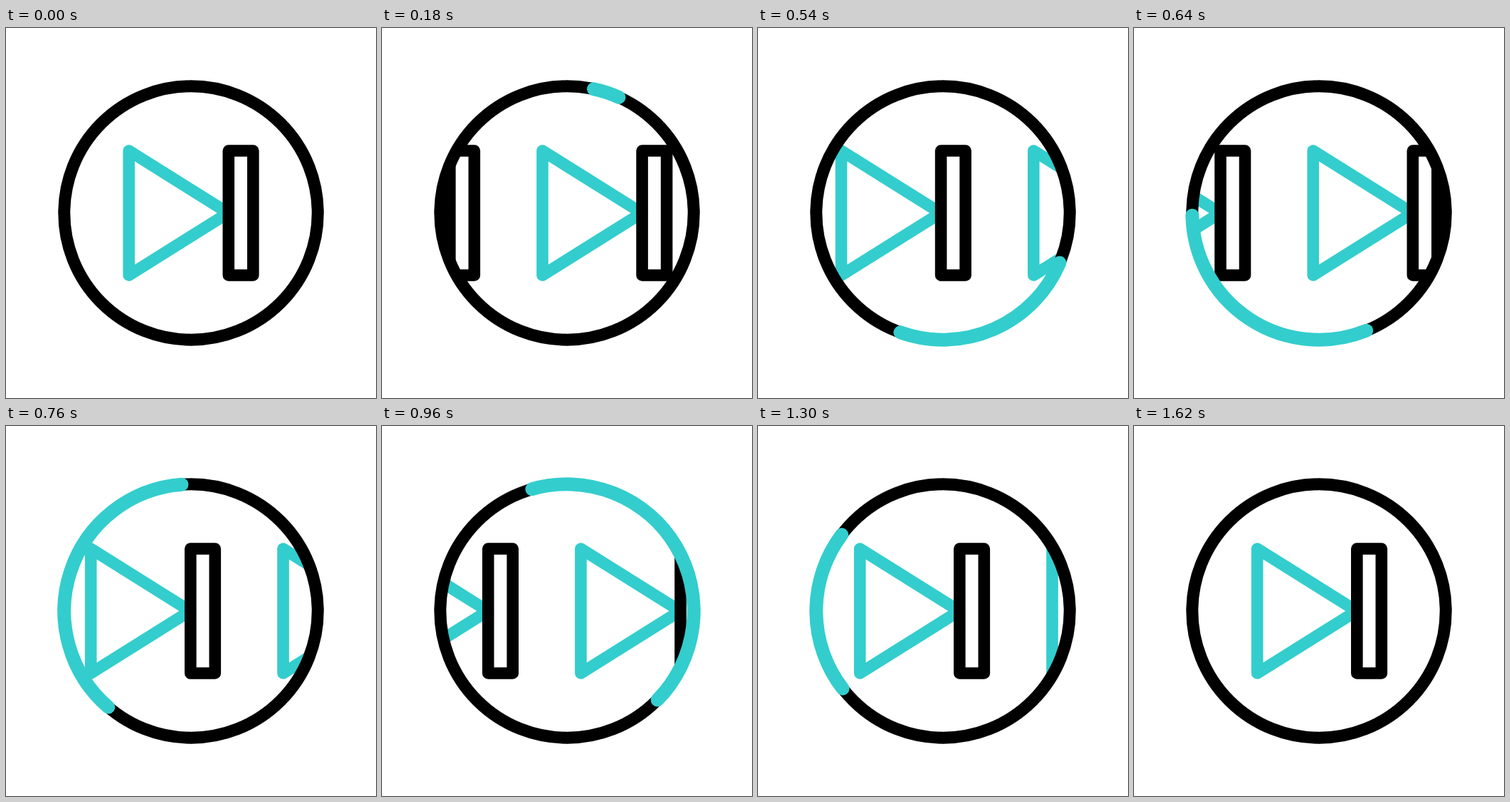
Animation, 520 px wide and 520 px high, one loop 2420 ms. Source, as an HTML page:

```html
<!DOCTYPE html>
<html lang="en">
<head>
<meta charset="utf-8">
<title>Skip button</title>
<style>
  html, body { margin: 0; width: 100%; height: 100%; overflow: hidden; background: #fff; }
  svg { display: block; width: 100vw; height: 100vh; }
  .icon { stroke-width: 16.6; stroke-linejoin: round; fill: none; }
</style>
</head>
<body>
<svg viewBox="0 0 520 520">
  <defs>
    <clipPath id="disc"><circle cx="260" cy="260" r="176"/></clipPath>
    <g id="skip" class="icon">
      <path d="M172.7 172.5V347.5L312.4 260Z" stroke="#33cdcd"/>
      <rect x="312.8" y="172.5" width="34.5" height="175" stroke="#000"/>
    </g>
  </defs>
  <g clip-path="url(#disc)">
    <g id="belt">
      <use href="#skip"/>
      <use href="#skip" x="-270.3"/>
    </g>
  </g>
  <circle cx="260" cy="260" r="178.2" fill="none" stroke="#000" stroke-width="17"/>
  <path id="arc" fill="none" stroke="#33cdcd" stroke-width="19" stroke-linecap="round"/>
</svg>
<script>
const LOOP = 2420, MOVE = 1620, STEP = 20;
const GAP = 270.3, RADIUS = 178.2;
const TIMES = [0, 320, 540, 760, 960, 1300, MOVE];

const belt = document.getElementById('belt');
const arc = document.getElementById('arc');

const smooth = s => s * s * (3 - 2 * s);
const unsmooth = y => 0.5 - Math.sin(Math.asin(1 - 2 * y) / 3);

// Eased travel through values at TIMES, at rest at both ends.
function track(values) {
  const last = values.length - 1, total = values[last];
  const s = values.map(v => unsmooth(v / total));
  const span = i => TIMES[i + 1] - TIMES[i];
  const chord = i => (s[i + 1] - s[i]) / span(i);
  const slope = s.map((_, i) => {
    if (i === 0 || i === last) return 0;
    const a = span(i - 1), b = span(i);
    return (chord(i - 1) * b + chord(i) * a) / (a + b);
  });
  slope[0] = 2 * chord(0) - slope[1];
  slope[last] = 2 * chord(last - 1) - slope[last - 1];

  return t => {
    if (t >= MOVE) return total;
    let i = 0;
    while (t >= TIMES[i + 1]) i++;
    const h = span(i), u = (t - TIMES[i]) / h, v = 1 - u;
    const p = s[i] * v * v * (1 + 2 * u) + s[i + 1] * u * u * (3 - 2 * u)
            + h * u * v * (slope[i] * v - slope[i + 1] * u);
    return total * smooth(Math.min(1, Math.max(0, p)));
  };
}

const shift = track([0, 172, 484.9, 757.4, 917.6, 1051.7, 1081.7]);
const tail = track([0, 39.1, 113.1, 220.7, 344, 592.3, 720]);
const head = track([0, 74.4, 199.7, 355.8, 494.5, 667, 720]);

function rim(deg) {
  const a = deg * Math.PI / 180;
  return (260 + RADIUS * Math.sin(a)).toFixed(3) + ' ' + (260 - RADIUS * Math.cos(a)).toFixed(3);
}

function draw(t) {
  belt.setAttribute('transform', `translate(${shift(t) % GAP} 0)`);
  const from = tail(t), to = head(t);
  const visible = to - from > 0.01;
  arc.setAttribute('d', visible
    ? `M${rim(from)}A${RADIUS} ${RADIUS} 0 0 1 ${rim(to)}` : '');
}

const start = performance.now();
function tick() {
  const t = (performance.now() - start) % LOOP;
  draw(Math.floor(t / STEP) * STEP);
  requestAnimationFrame(tick);
}
draw(0);
requestAnimationFrame(tick);
</script>
</body>
</html>
```
